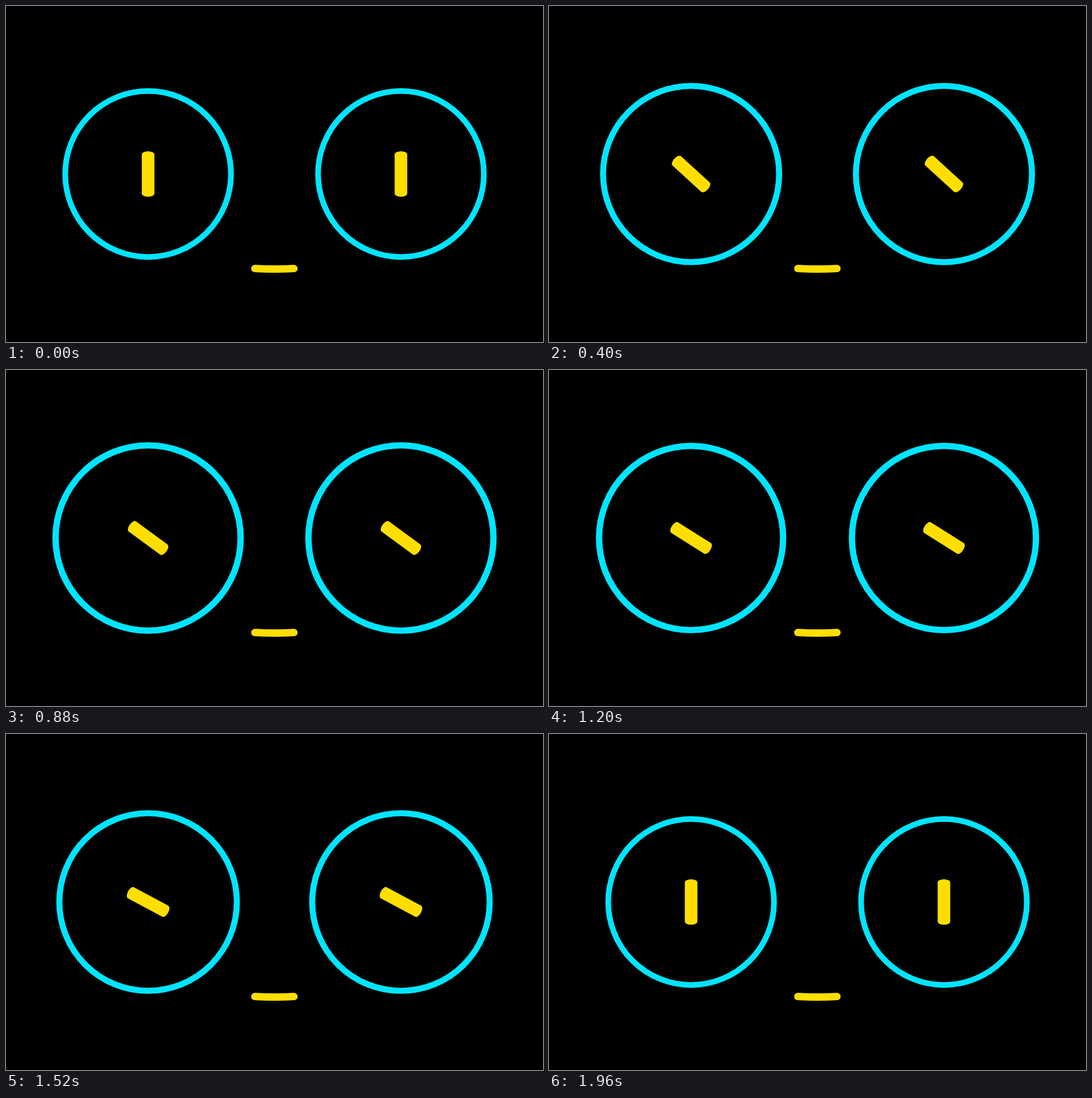
Animation of 947 by 592 pixels, one loop 2000 ms. Source, as an HTML page with a canvas:

```html
<!DOCTYPE html>
<html lang="en">
<head>
<meta charset="utf-8">
<title>Blinking face</title>
<style>
html, body { margin: 0; width: 100%; height: 100%; overflow: hidden; background: #000; }
canvas { display: block; }
</style>
</head>
<body>
<canvas id="stage" width="947" height="592"></canvas>
<script>
const ctx = document.getElementById('stage').getContext('2d');
const CYAN = '#00e5ff', YELLOW = '#ffde00';
const LOOP = 2000, STEP = 40, PEAK = 1000, END = 1960;
const EYES = [250.6, 696.5], EYE_Y = 296;

// Linear start, soft landing: cubic-bezier(.167, .167, .667, 1)
function easeOut(x) {
  const curve = (s, a, b) => 3 * (1 - s) * (1 - s) * s * a + 3 * (1 - s) * s * s * b + s * s * s;
  let lo = 0, hi = 1;
  for (let i = 0; i < 24; i++) {
    const mid = (lo + hi) / 2;
    if (curve(mid, 0.167, 0.667) < x) lo = mid; else hi = mid;
  }
  return curve((lo + hi) / 2, 0.167, 1);
}

// Piecewise linear value over [time, value] pairs
function track(t, keys) {
  for (let i = 1; i < keys.length; i++) {
    const [t0, v0] = keys[i - 1], [t1, v1] = keys[i];
    if (t <= t1) return v0 + (v1 - v0) * (t - t0) / (t1 - t0);
  }
  return keys[keys.length - 1][1];
}

function ring(x, scale) {
  ctx.lineWidth = 10 * scale;
  ctx.strokeStyle = CYAN;
  ctx.beginPath();
  ctx.arc(x, EYE_Y, 146.2 * scale, 0, Math.PI * 2);
  ctx.stroke();
}

function pupil(x, angle) {
  const w = 11.1, h = 34.5, cap = 5.5;
  ctx.save();
  ctx.translate(x, EYE_Y);
  ctx.rotate(angle * Math.PI / 180);
  ctx.fillStyle = YELLOW;
  ctx.beginPath();
  ctx.ellipse(0, -h, w, cap, 0, Math.PI, Math.PI * 2);
  ctx.ellipse(0, h, w, cap, 0, 0, Math.PI);
  ctx.closePath();
  ctx.fill();
  ctx.restore();
}

function mouth() {
  ctx.strokeStyle = YELLOW;
  ctx.lineWidth = 13;
  ctx.lineCap = 'round';
  ctx.beginPath();
  ctx.moveTo(438.8, 462.6);
  ctx.quadraticCurveTo(473.3, 464.4, 507.8, 462.6);
  ctx.stroke();
}

function draw(t) {
  ctx.fillStyle = '#000';
  ctx.fillRect(0, 0, 947, 592);
  const grow = t <= PEAK ? t / PEAK : Math.max(0, (END - t) / (END - PEAK));
  const scale = 1 + 0.12 * easeOut(grow);
  const angle = track(t, [[0, 0], [200, -45], [1760, -65], [END, 0]]);
  for (const x of EYES) {
    ring(x, scale);
    pupil(x, angle);
  }
  mouth();
}

function tick() {
  const t = (performance.now() + 1) % LOOP;
  draw(Math.floor(t / STEP) * STEP);
  requestAnimationFrame(tick);
}
tick();
</script>
</body>
</html>
```
